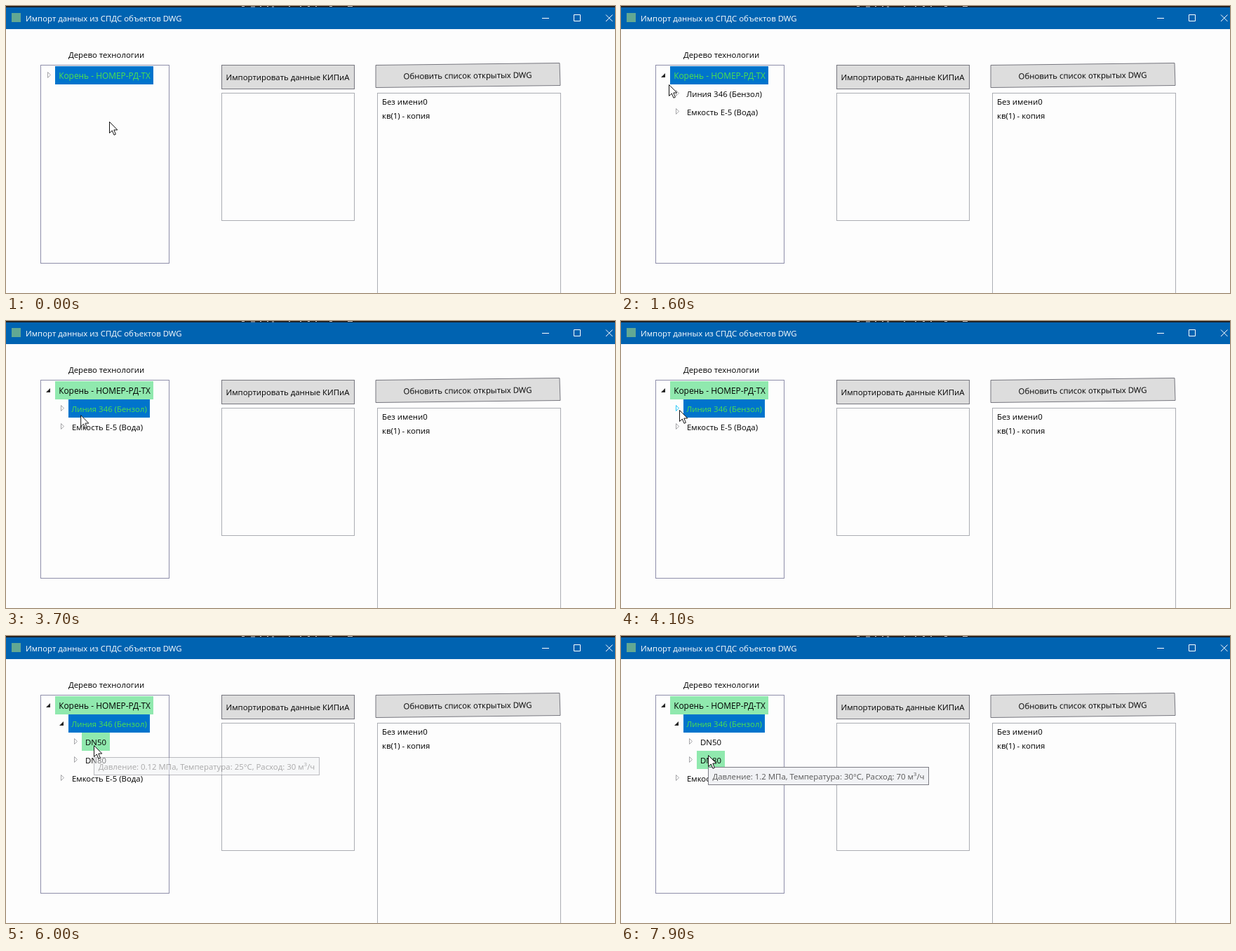
An HTML page for the animation above (8000 ms loop, 868 by 410 pixels).

```html
<!DOCTYPE html>
<html lang="ru">
<head>
<meta charset="utf-8">
<title>Импорт данных</title>
<style>
  html, body { margin: 0; width: 100%; height: 100%; overflow: hidden; background: #fdfdfd; }
  svg { display: block; }
  text { font: 11.4px "Open Sans", "Noto Sans", sans-serif; fill: #000; }
  .mid { text-anchor: middle; }
  .box { fill: none; stroke: #abadb3; }
  .button { fill: #dddddd; stroke: #77777f; }
  .hover { fill: #90e9ae; }
  .chosen { fill: #0074cc; }
  .closed { fill: #fdfdfd; stroke: #a5a5a8; }
  .open { fill: #262626; }
  .tip rect { fill: #f1f2f5; stroke: #7c7c84; }
  .tip text { fill: #575757; }
  .tip tspan { font-size: 8px; }

  /* hard switches */
  .rootClosed, .rootOpen, .chosenRoot, .hoverRoot, .hoverLine, .chosenLine,
  .lineClosed, .lineOpen, .hover50, .hover80, .tank, .rootText, .lineText,
  .rootGlow, .lineGlow { animation: 8s step-end infinite; }
  .rootClosed { animation-name: hide-root; }
  .rootOpen { animation-name: show-root; }
  .chosenRoot { animation-name: hide-select; }
  .hoverRoot, .chosenLine { animation-name: show-select; }
  .hoverLine { animation-name: hover-line; }
  .lineClosed { animation-name: hide-line; }
  .lineOpen { animation-name: show-line; }
  .hover50 { animation-name: hover-50; }
  .hover80 { animation-name: hover-80; }
  .tank { animation-name: push-tank; }
  .rootText { animation-name: root-text; font-size: 11.9px; }
  .lineText { animation-name: line-text; }
  .rootGlow { animation-name: root-glow; }
  .lineGlow { animation-name: line-glow; }

  @keyframes hide-root { 0% { opacity: 1 } 17.5%, 100% { opacity: 0 } }
  @keyframes show-root { 0% { opacity: 0 } 17.5%, 100% { opacity: 1 } }
  @keyframes hide-select { 0% { opacity: 1 } 40%, 100% { opacity: 0 } }
  @keyframes show-select { 0% { opacity: 0 } 40%, 100% { opacity: 1 } }
  @keyframes hover-line { 0% { opacity: 0 } 27.5% { opacity: 1 } 40%, 100% { opacity: 0 } }
  @keyframes hide-line { 0% { opacity: 1 } 53.75%, 100% { opacity: 0 } }
  @keyframes show-line { 0% { opacity: 0 } 53.75%, 100% { opacity: 1 } }
  @keyframes hover-50 { 0% { opacity: 0 } 65% { opacity: 1 } 87.5%, 100% { opacity: 0 } }
  @keyframes hover-80 { 0% { opacity: 0 } 87.5%, 100% { opacity: 1 } }
  @keyframes push-tank { 0% { transform: none } 53.75%, 100% { transform: translateY(52px) } }
  @keyframes root-text { 0% { fill: #4fe34c } 40%, 100% { fill: #000 } }
  @keyframes line-text { 0% { fill: #000 } 40%, 100% { fill: #4fe34c } }
  @keyframes root-glow { 0% { stroke: #a5a5a8 } 11.25% { stroke: #27c7f7 } 17.5%, 100% { stroke: #a5a5a8 } }
  @keyframes line-glow { 0% { stroke: #a5a5a8 } 50% { stroke: #27c7f7 } 53.75%, 100% { stroke: #a5a5a8 } }

  /* smooth motion */
  .pointer { animation: pointer 8s linear infinite; }
  .tip1 { animation: tip1 8s linear infinite; }
  .tip2 { animation: tip2 8s linear infinite; }
  @keyframes pointer {
    0%, 1.25% { transform: translate(147px, 165px) }
    11.25%, 17.5% { transform: translate(61px, 99px) }
    20%, 23.75% { transform: translate(68px, 112px) }
    32.5%, 45% { transform: translate(112px, 136px) }
    51.25%, 57.5% { transform: translate(83px, 127px) }
    67.5%, 83.75% { transform: translate(125px, 156px) }
    90%, 100% { transform: translate(124px, 170px) }
  }
  @keyframes tip1 { 0%, 72.5% { opacity: 0 } 77.5%, 92% { opacity: 1 } 93.75%, 100% { opacity: 0 } }
  @keyframes tip2 { 0%, 94.5% { opacity: 0 } 98%, 100% { opacity: 1 } }
</style>
</head>
<body>
<svg width="868" height="410" viewBox="0 0 868 410">
  <defs>
    <path id="shut" d="M.5 -4.5V3.5L4.5 -.5Z"/>
    <path id="down" d="M6 -3V3H0Z"/>
  </defs>
  <rect width="868" height="410" fill="#fdfdfd"/>

  <!-- title bar -->
  <rect width="868" height="33" fill="#0063b1"/>
  <rect width="868" height="2" fill="#222224"/>
  <path d="M336 .5h4M349 1h6M362 .5h2M372 .5h2M379 1h3M403 .5h2M419 .5h2M430 .5h3M441 .5h2M461 .5h4M487 .5h7" stroke="#c8c8cc"/>
  <rect x="8" y="10" width="13" height="13" fill="#62a893"/>
  <text x="28" y="22" style="fill:#fff">Импорт данных из СПДС объектов DWG</text>
  <path d="M764 17.5h10M809.5 12.5h9v9h-9ZM855 12.5l9.5 9.5M864.5 12.5l-9.5 9.5" fill="none" stroke="#fff"/>

  <!-- lists and buttons -->
  <text class="mid" x="143" y="74">Дерево технологии</text>
  <rect x="49.5" y="84.5" width="183" height="283" fill="none" stroke="#8e8eaa"/>
  <rect class="button" x="307.5" y="84.5" width="189" height="34"/>
  <text class="mid" x="401.5" y="106">Импортировать данные КИПиА</text>
  <rect class="box" x="307.5" y="124.5" width="189" height="182"/>
  <path class="button" d="M527 84.5L789 81.5L790 113.5L527 116.5Z"/>
  <text class="mid" x="658" y="103.5" transform="rotate(-.6 658 99)">Обновить список открытых DWG</text>
  <rect class="box" x="529.5" y="124.5" width="261" height="300"/>
  <text x="536" y="141">Без имени0</text>
  <text x="536" y="161">кв(1) - копия</text>

  <!-- tree -->
  <rect class="chosen chosenRoot" x="70" y="86" width="140" height="26"/>
  <rect class="hover hoverRoot" x="70" y="86" width="140" height="26"/>
  <text class="mid rootText" x="140.5" y="104">Корень - НОМЕР-РД-ТХ</text>
  <g class="rootClosed"><use href="#shut" x="59" y="99" class="closed rootGlow"/></g>
  <g class="rootOpen">
    <use href="#down" x="57" y="99" class="open"/>
    <rect class="hover hoverLine" x="89" y="112" width="116" height="26"/>
    <rect class="chosen chosenLine" x="89" y="112" width="116" height="26"/>
    <text class="mid lineText" x="147" y="130">Линия 346 (Бензол)</text>
    <g class="lineClosed"><use href="#shut" x="78" y="125" class="closed lineGlow"/></g>
    <g class="lineOpen">
      <use href="#down" x="76" y="125" class="open"/>
      <rect class="hover hover50" x="108" y="138" width="40" height="26"/>
      <rect class="hover hover80" x="108" y="164" width="40" height="26"/>
      <use href="#shut" x="97" y="151" class="closed"/>
      <use href="#shut" x="97" y="177" class="closed"/>
      <text class="mid" x="128" y="156">DN50</text>
      <text class="mid" x="128" y="182">DN80</text>
    </g>
    <g class="tank">
      <use href="#shut" x="78" y="151" class="closed"/>
      <text class="mid" x="144.5" y="156">Емкость Е-5 (Вода)</text>
    </g>
  </g>

  <!-- tooltips -->
  <g class="tip tip1">
    <rect x="125.5" y="173.5" width="321" height="25"/>
    <text class="mid" x="286" y="191">Давление: 0.12 МПа, Температура: 25°C, Расход: 30 м<tspan dy="-5">3</tspan><tspan dy="5" style="font-size:inherit">/ч</tspan></text>
  </g>
  <g class="tip tip2">
    <rect x="124.5" y="187.5" width="314" height="25"/>
    <text class="mid" x="281.5" y="205">Давление: 1.2 МПа, Температура: 30°C, Расход: 70 м<tspan dy="-5">3</tspan><tspan dy="5" style="font-size:inherit">/ч</tspan></text>
  </g>

  <path class="pointer" d="M.5 .5V16.5L4.3 13L7 19.3L9.4 18.2L6.8 12H11.8Z" fill="#fff" stroke="#111"/>
</svg>
</body>
</html>
```
